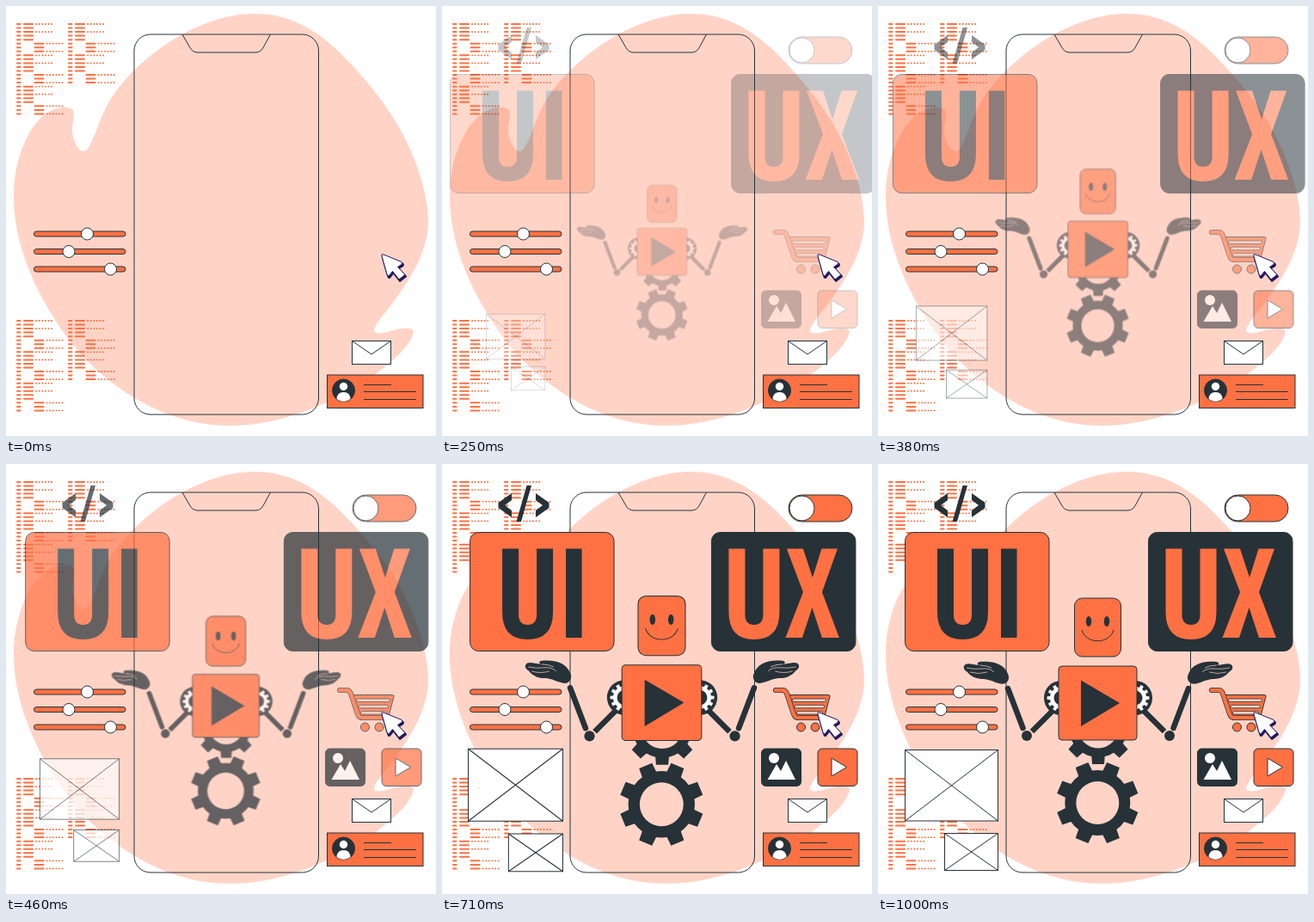
Recreate the animation shown at these times as an HTML page. Size 500 px wide and 500 px high, loop 1040 ms.

```html
<!DOCTYPE html>
<html lang="en">
<head>
<meta charset="utf-8">
<title>UI UX</title>
<style>
  html, body { margin: 0; width: 100%; height: 100%; overflow: hidden; background: #fff; }
  svg { display: block; width: 100%; height: 100%; }
  .o, .w, .d, .l { stroke: #263238; stroke-width: 1; }
  .o { fill: #ff7143; }
  .w { fill: #fff; }
  .d { fill: #263238; }
  .l { fill: none; }
  .p { fill: #ffd4c7; }
  .white { fill: #fff; }
  .code { fill: none; stroke: #ff7143; stroke-width: 2; stroke-linecap: round; }
</style>
</head>
<body>
<svg viewBox="0 0 500 500">
  <defs>
    <path id="arrow" d="M437 291Q436 288 439 289L460 297.500Q462 299 460 300.500L455.500 303.500L464 312.500L457 318L449.500 308.500L445.500 313.500Q444 315 443 312Z"/>
  </defs>
  <path class="p" d="M289 9C330 9 359 27 386 52C420 86 445 117 463 152C479 184 491 220 491 252C490 287 470 317 450 345C439 359 429 370 428 377C428 383 440 380 450 377C462 374 473 374 474 378C472 390 462 402 440 420C400 452 330 488 260 488C195 488 138 455 98 416C52 370 9 292 9 222C9 170 33 124 60 119C67 117 75 117 78 121C81 128 77 135 77 145C77 152 83 169 90 169C101 169 107 126 128 99C165 50 230 9 289 9Z"/>
  <g id="code" class="code"></g>
  <g class="l">
    <rect x="149" y="33" width="214.500" height="442" rx="19"/>
    <path d="M205 33L214 48.500Q217 54 223 54H290Q296 54 299 48.500L307.500 33"/>
  </g>
  <g id="sliders"></g>

  <g id="icons">
    <path fill="#263238" d="M98.500 25h5.500L92 67h-5.500Z M81 34v8l-8 6 8 6v8L65.500 51v-6Z M109 34v8l8 6-8 6v8L124.500 51v-6Z"/>
    <rect class="o" x="403" y="36" width="74" height="31" rx="15.500"/>
    <circle class="w" cx="418.500" cy="51.500" r="14.500"/>
    <g id="cart"></g>
    <rect class="d" x="371.500" y="331" width="46" height="43.500" rx="5"/>
    <circle class="white" cx="386" cy="342" r="6"/>
    <path class="white" d="M378.500 367L389 349L394 357L400 345L411 367Z"/>
    <rect class="o" x="437" y="331" width="46" height="43.500" rx="5"/>
    <path class="w" d="M453 342L470.500 352.500L453 363Z"/>
  </g>

  <g id="wires">
    <rect class="w" x="31.500" y="332.500" width="108" height="82.500"/>
    <path class="l" d="M31.500 332.500l108 82.500m0-82.500l-108 82.500"/>
    <rect class="w" x="77.500" y="429.500" width="62" height="43"/>
    <path class="l" d="M77.500 429.500l62 43m0-43l-62 43"/>
  </g>

  <g id="ui" role="img" aria-label="UI">
    <rect class="o" x="31.500" y="79.500" width="167.500" height="138" rx="10"/>
    <g fill="#263238">
      <path d="M69 98.500H88V175Q88 187 98.500 187T109 175V98.500H128V172Q128 204 98.500 204T69 172Z"/>
      <path d="M143 98.500h18.500V202H143Z"/>
    </g>
  </g>
  <g id="ux" role="img" aria-label="UX">
    <rect class="d" x="314.500" y="79.500" width="167.500" height="138" rx="10"/>
    <g fill="#ff7143">
      <path d="M334.500 98.500H353.500V175Q353.500 187 364 187T374.500 175V98.500H393.500V172Q393.500 204 364 204T334.500 172Z"/>
      <path d="M402 98.500H421L432 132L442.500 98.500H461L443 149L463 202H443L431.500 167L420 202H400.500L421 149Z"/>
    </g>
  </g>

  <g id="robot"></g>

  <g stroke="#211a5e" stroke-linejoin="round">
    <use href="#arrow" fill="#211a5e" stroke-width="2" transform="translate(1 2)"/>
    <use href="#arrow" fill="#fff"/>
  </g>
  <rect class="w" x="402.500" y="389.500" width="45" height="27"/>
  <path class="l" d="M402.500 389.500L425 405L447.500 389.500"/>
  <rect class="o" x="373.500" y="429" width="111.500" height="38.500"/>
  <circle class="d" cx="392.500" cy="447" r="13"/>
  <circle class="white" cx="392.500" cy="442.500" r="4.700"/>
  <path class="white" d="M384.500 457Q385 449 392.500 449T400.500 457Q392.500 463 384.500 457Z"/>
  <path class="l" d="M416 440.500h32M416 448.500h61M416 457.500h61"/>
</svg>
<script>
const $ = id => document.getElementById(id);

// Code listing: blocks of eight rows, the last three indented
function listing(x, y, blocks) {
  let out = '';
  for (let i = 0; i < blocks * 8; i++) {
    const row = i % 8, rowY = y + i * 4.54, inner = x + (row > 4 ? 21.5 : 9);
    out += `<path d="M${x + 1} ${rowY}h3.500M${inner} ${rowY}h10"/>`;
    if ([0, 2, 5, 7].includes(row))
      out += `<path stroke-dasharray="0.300 3.300" stroke-width="1.800" d="M${inner + 14} ${rowY}h18.400"/>`;
  }
  return out;
}
$('code').innerHTML = [21, 366].map(y => listing(12, y, 3) + listing(72, y, 2)).join('');

$('sliders').innerHTML = [[94.5, 265], [73, 285.5], [121.5, 306]].map(([x, y]) =>
  `<rect class="o" x="32.500" y="${y - 3}" width="106.500" height="6" rx="3"/>
   <circle class="w" cx="${x}" cy="${y}" r="7"/>`).join('');

const handle = 'M388 263H396Q399.500 263 401 267L409 291Q410.500 295 414 295H444';
$('cart').innerHTML = `
  <path class="o" d="M401 268.500H449.500Q451.500 268.500 451 270.500L444.500 295Q444 297.500 441 297.500H412Z"/>
  <path d="${handle}" fill="none" stroke="#263238" stroke-width="6" stroke-linecap="round"/>
  <path d="${handle}" fill="none" stroke="#ff7143" stroke-width="4.500" stroke-linecap="round"/>` +
  [0, 1, 2].map(i => `<rect class="p" stroke="#263238" stroke-width=".8" x="${407.5 + i * 2.5}" y="${273 + i * 7.3}" width="${39 - i * 4.5}" height="3.500" rx="1.700"/>`).join('') +
  [417.5, 434].map(x => `<circle class="o" cx="${x}" cy="306" r="5"/>`).join('');

function gear(cx, cy, teeth, outer, root, hole, turn) {
  const pts = [];
  for (let i = 0; i < teeth; i++)
    for (const [off, r] of [[-.29, root], [-.21, outer], [.21, outer], [.29, root], [.5, root]]) {
      const a = turn + (i + off) * 2 * Math.PI / teeth;
      pts.push((cx + r * Math.cos(a)).toFixed(1) + ' ' + (cy + r * Math.sin(a)).toFixed(1));
    }
  return `M${pts.join('L')}ZM${cx - hole} ${cy}a${hole} ${hole} 0 1 0 ${2 * hole} 0a${hole} ${hole} 0 1 0 ${-2 * hole} 0Z`;
}

const arm = `
  <circle cx="213" cy="272" r="20" fill="#263238"/>
  <path class="white" fill-rule="evenodd" d="${gear(213, 272, 12, 16.5, 13, 8.5, 0)}"/>
  <path d="M203 287L179 311" stroke="#263238" stroke-width="6.500"/>
  <path d="M168.500 307L151 261" stroke="#263238" stroke-width="6.500" stroke-linecap="round"/>
  <circle cx="173" cy="316" r="6" fill="#263238"/>
  <path fill="#263238" d="M100 235C102 230 110 233 117 234C113 230 119 229 129 230C141 231 147 236 150 242C153 247 153 252 148 255C141 258 132 250 122 250C113 250 107 246 104 242C101 240 99 238 100 235Z"/>
  <path d="M103 237Q112 239 121 238T135 242M107 242Q117 245 127 242M118 234Q126 234 132 237" fill="none" stroke="#ffd4c7" stroke-width=".7"/>`;

$('robot').innerHTML = `
  ${arm}<g transform="matrix(-1 0 0 1 512 0)">${arm}</g>
  <g fill="#263238" fill-rule="evenodd">
    <path d="${gear(256, 307, 8, 42.5, 34, 23.5, Math.PI / 2)}"/>
    <path d="${gear(255.3, 394, 8, 48.3, 38, 25, Math.PI / 8)}"/>
  </g>
  <rect class="o" x="228.500" y="156" width="54" height="68" rx="9"/>
  <g fill="#263238">
    <ellipse cx="245" cy="183" rx="3.200" ry="6"/>
    <ellipse cx="266" cy="183" rx="3.200" ry="6"/>
  </g>
  <path class="l" d="M237 193C242 210 269 210 274 193"/>
  <rect class="o" x="210" y="235" width="91" height="86" rx="4"/>
  <path fill="#263238" d="M236 251.500L281 278L236 305Z"/>`;

// cubic-bezier(.36, -.01, .5, 1.38), solved by bisection
function ease(x) {
  const curve = (a, b, s) => 3 * (1 - s) * s * ((1 - s) * a + s * b) + s ** 3;
  let lo = 0, hi = 1;
  for (let i = 0; i < 24; i++) {
    const mid = (lo + hi) / 2;
    if (curve(.36, .5, mid) < x) lo = mid; else hi = mid;
  }
  return curve(-.01, 1.38, lo);
}

function pose(id, alpha, transform = '') {
  $(id).setAttribute('opacity', alpha);
  $(id).setAttribute('transform', transform);
}
const zoom = (x, y, s) => `translate(${x} ${y}) scale(${s}) translate(${-x} ${-y})`;

function draw(now) {
  // 25 equal steps per loop
  const step = Math.min(24, Math.floor((now % 1040 + 4) / 41.6));
  const p = step ? ease(Math.min(1, step / 24 + .022)) : 0;
  const alpha = Math.max(0, Math.min(1, p)), scale = .5 + p / 2;
  pose('icons', alpha);
  pose('ui', alpha, `translate(${30 * (p - 1)} 0)`);
  pose('ux', alpha, `translate(${30 * (1 - p)} 0)`);
  pose('wires', alpha, zoom(86, 402.5, scale));
  pose('robot', alpha, zoom(256, 299, scale));
}

const start = performance.now();
function tick() {
  draw(performance.now() - start);
  requestAnimationFrame(tick);
}
tick();
</script>
</body>
</html>
```
